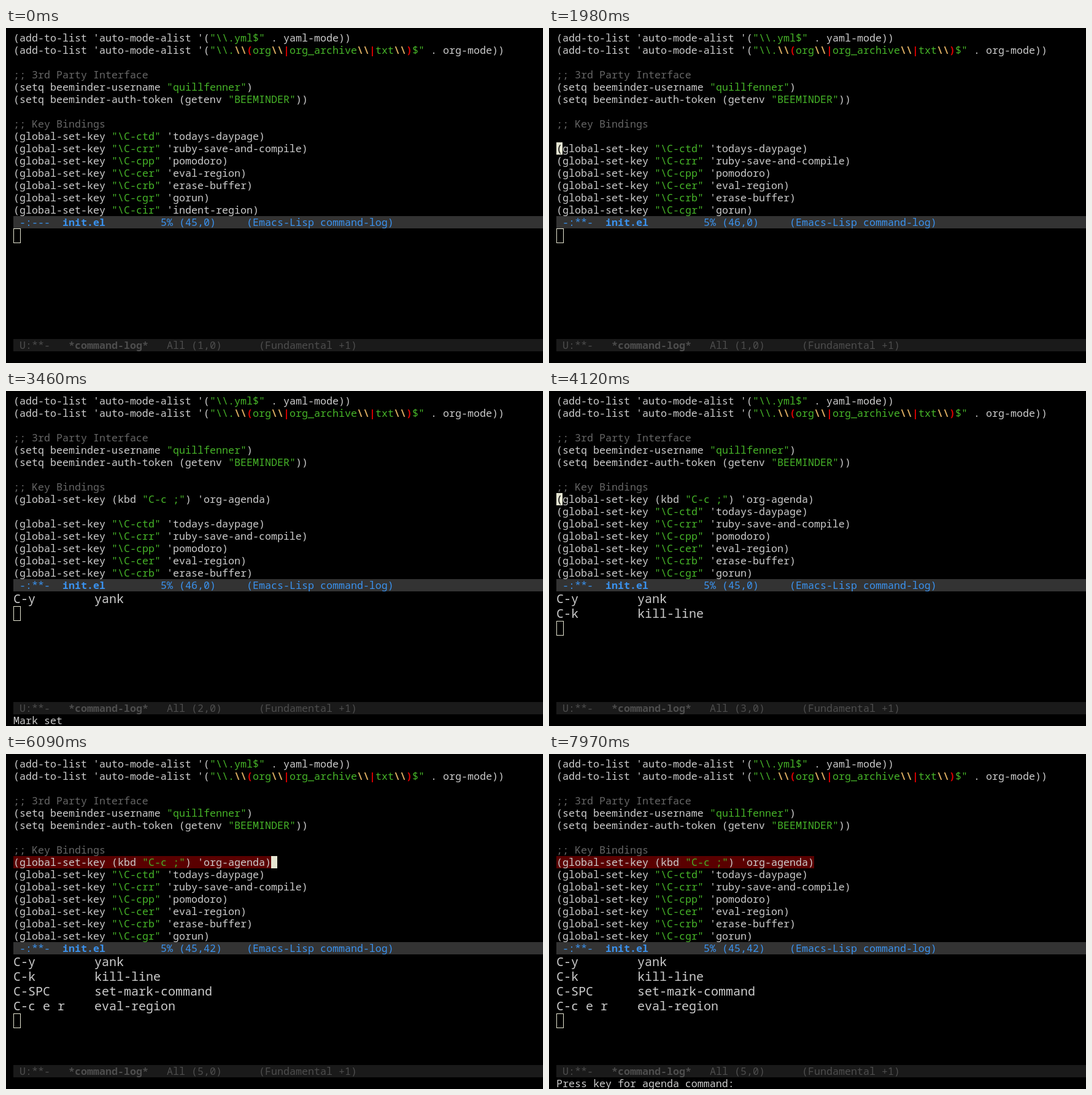
Write an HTML page with a canvas that moves like this. It is 875 px wide and 545 px high and loops after 8000 ms.

```html
<!DOCTYPE html>
<html lang="en">
<head>
<meta charset="utf-8">
<title>Editor session</title>
<style>
  html, body { margin: 0; width: 100%; height: 100%; overflow: hidden; background: #000; }
  canvas { display: block; }
</style>
</head>
<body>
<canvas id="stage" width="875" height="545"></canvas>
<script>
const ctx = document.getElementById('stage').getContext('2d', { alpha: false });
const LOOP = 8000, LEFT = 12, TOP = 6;
const CELL = 10, ROW = 20, LOG_CELL = 12, LOG_ROW = 24;
const BODY_ROW = 8, MODELINE_Y = 306, LOG_Y = 326, LOG_MODELINE_Y = 506, ECHO_Y = 526;
const FACE = '"Noto Sans Mono", "Liberation Mono", monospace';
const LIGHT = 300, BOLD = 700;
const COLOR = {
  text: '#cccccc', comment: '#666666', string: '#46b428',
  backslash: '#d9ab60', group: '#e00000', cursor: '#e6e6d2', region: '#5a0000',
  active: '#3a92ee', activeBar: '#333333', idle: '#4d4d4d', idleBar: '#1a1a1a'
};

const header = String.raw`(add-to-list 'auto-mode-alist '("\\.yml$" . yaml-mode))
(add-to-list 'auto-mode-alist '("\\.\\(org\\|org_archive\\|txt\\)$" . org-mode))

;; 3rd Party Interface
(setq beeminder-username "quillfenner")
(setq beeminder-auth-token (getenv "BEEMINDER"))

;; Key Bindings`.split('\n');

const bindings = [
  ['ctd', 'todays-daypage'], ['crr', 'ruby-save-and-compile'], ['cpp', 'pomodoro'],
  ['cer', 'eval-region'], ['crb', 'erase-buffer'], ['cgr', 'gorun'], ['cir', 'indent-region']
].map(([keys, command]) => `(global-set-key "\\C-${keys}" '${command})`);

const yanked = `(global-set-key (kbd "C-c ;") 'org-agenda)`;

const commands = [
  ['C-y', 'yank'], ['C-k', 'kill-line'],
  ['C-SPC', 'set-mark-command'], ['C-c e r', 'eval-region']
];

// Each step changes only the listed parts of the editor state.
const steps = [
  [0, { inserted: [], line: 45, col: 0, cursor: false, modified: false, region: false, logged: 0, echo: '' }],
  [100, { cursor: true }],
  [590, { cursor: false }],
  [860, { cursor: true }],
  [1360, { cursor: false }],
  [1860, { inserted: [''], line: 46, cursor: true, modified: true }],
  [2420, { line: 45 }],
  [2920, { inserted: [yanked, ''], line: 46, echo: 'Mark set' }],
  [2960, { logged: 1 }],
  [3460, { cursor: false }],
  [3780, { inserted: [yanked], cursor: true, echo: '' }],
  [3820, { logged: 2 }],
  [4080, { line: 45 }],
  [4370, { echo: 'Mark set' }],
  [4410, { logged: 3 }],
  [4610, { col: 42, region: true, echo: '' }],
  [5110, { cursor: false }],
  [5600, { cursor: true }],
  [6090, { logged: 4 }],
  [6540, { cursor: false }],
  [7040, { cursor: true }],
  [7530, { cursor: false }],
  [7970, { echo: 'Press key for agenda command:' }]
];

function stateAt(time) {
  return Object.assign({}, ...steps.filter(([start]) => start <= time).map(([, change]) => change));
}

function box(x, y, width, height, color) {
  ctx.fillStyle = color;
  ctx.fillRect(x, y, width, height);
}

function write(text, col, y, color, weight = LIGHT) {
  ctx.font = `${weight} ${CELL / 0.6}px ${FACE}`;
  ctx.fillStyle = color;
  ctx.fillText(text, LEFT + col * CELL, y + 16);
}

function writeCode(code, row) {
  let col = 0;
  const put = (piece, color, weight) => {
    write(piece, col, TOP + row * ROW, color, weight);
    col += piece.length;
  };
  const putString = piece => {
    if (piece === '\\\\') put(piece, COLOR.backslash, BOLD);
    else if (/^[(|)]$/.test(piece)) put(piece, COLOR.group, BOLD);
    else put(piece, COLOR.string);
  };
  for (const token of code.match(/^;;.*|"[^"]*"|[^"]+/g) || []) {
    if (token.startsWith(';;')) put(token, COLOR.comment);
    else if (token.startsWith('"')) token.split(/(\\\\(?=[(|)])|[(|)])/).forEach(putString);
    else put(token, COLOR.text);
  }
}

function drawBuffer({ inserted, line, col, cursor, region }) {
  const body = [...inserted, ...bindings].slice(0, 7);
  if (region) box(LEFT, TOP + BODY_ROW * ROW, col * CELL, ROW, COLOR.region);
  [...header, ...body].forEach(writeCode);
  if (!cursor) return;
  const index = line - 45, y = TOP + (BODY_ROW + index) * ROW;
  box(LEFT + col * CELL, y, CELL, ROW, COLOR.cursor);
  write(body[index][col] || '', col, y, '#000');
}

function drawModeline(y, bar, color, parts, boldName) {
  box(LEFT, y, 875 - LEFT, ROW, bar);
  for (const [col, text] of parts) write(text, col, y, color, text === boldName ? BOLD : LIGHT);
}

function drawLog(count) {
  ctx.font = `${LIGHT} ${LOG_CELL / 0.6}px ${FACE}`;
  ctx.fillStyle = COLOR.text;
  commands.slice(0, count).forEach(([keys, command], i) => {
    const baseline = LOG_Y + i * LOG_ROW + 19;
    ctx.fillText(keys, LEFT, baseline);
    ctx.fillText(command, LEFT + 11 * LOG_CELL, baseline);
  });
  ctx.strokeStyle = COLOR.cursor;
  ctx.strokeRect(LEFT + 0.5, LOG_Y + count * LOG_ROW + 0.5, LOG_CELL - 1, LOG_ROW - 1);
}

function draw(state) {
  box(0, 0, 875, 545, '#000');
  drawBuffer(state);
  drawModeline(MODELINE_Y, COLOR.activeBar, COLOR.active, [
    [1, state.modified ? '-:**-' : '-:---'], [8, 'init.el'],
    [24, `5% (${state.line},${state.col})`], [38, '(Emacs-Lisp command-log)']
  ], 'init.el');
  drawLog(state.logged);
  drawModeline(LOG_MODELINE_Y, COLOR.idleBar, COLOR.idle, [
    [1, 'U:**-'], [9, '*command-log*'],
    [25, `All (${state.logged + 1},0)`], [40, '(Fundamental +1)']
  ], '*command-log*');
  write(state.echo, 0, ECHO_Y, COLOR.text);
}

function tick() {
  draw(stateAt(performance.now() % LOOP));
  requestAnimationFrame(tick);
}
tick();
</script>
</body>
</html>
```
